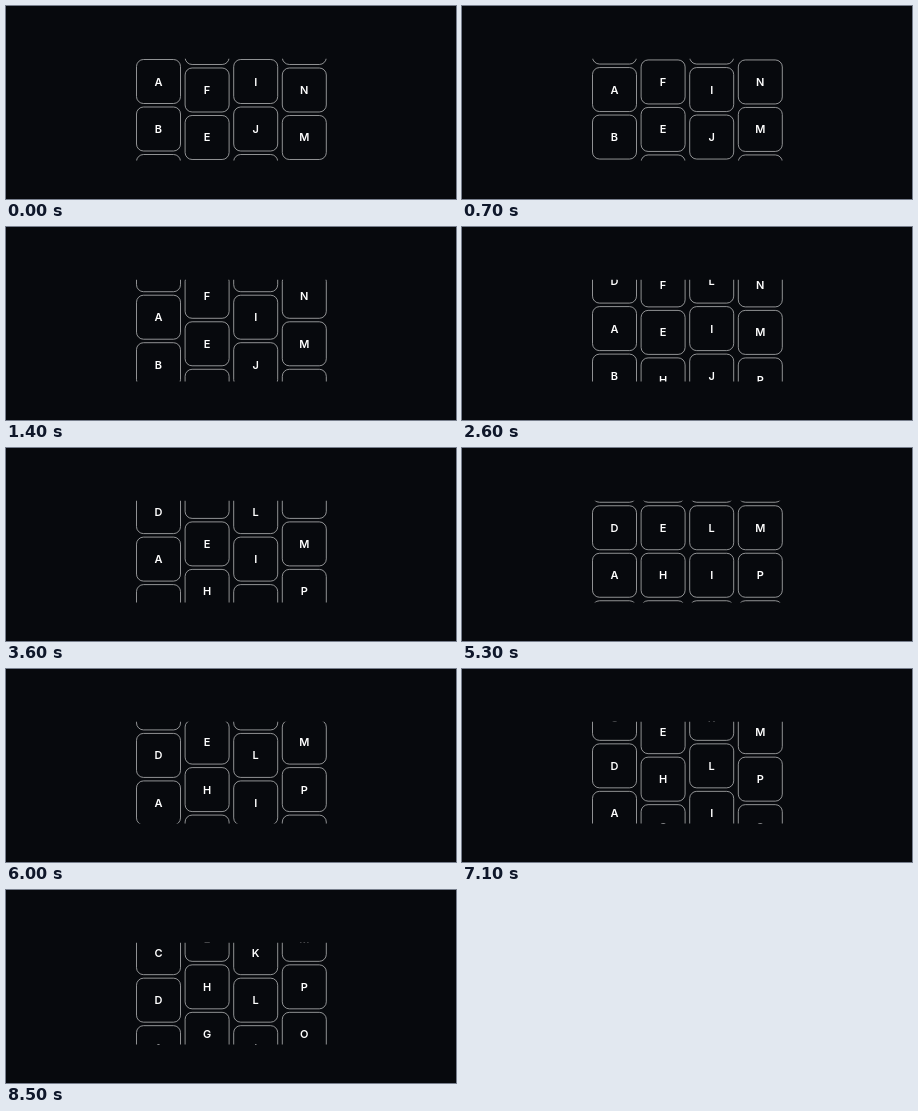
Recreate the animation shown at these times as an HTML page. Size 450 px wide and 193 px high, loop 8600 ms.

```html
<!DOCTYPE html>
<html lang="en">
<head>
<meta charset="utf-8">
<title>Letter tiles</title>
<style>
  html, body { margin: 0; width: 100%; height: 100%; overflow: hidden; background: #07090d; }
  svg { display: block; width: 100%; height: 100%; }
  rect.key { fill: none; stroke: #b4b5b7; stroke-width: .8; }
  text { font: 600 11px Inter, sans-serif; fill: #fff; text-anchor: middle; }
</style>
</head>
<body>
<svg viewBox="0 0 450 193">
  <defs><clipPath id="view"><rect x="129" y="52.8" width="193" height="101.7"/></clipPath></defs>
  <g id="board" clip-path="url(#view)"></g>
</svg>
<script>
const LOOP = 8600;
const SIZE = 44, PITCH = 47.5, COLUMN = 48.6, LEFT = 130.5;
const SPEED = PITCH / 5000;
const columns = [
  { letters: 'ABCD', top: 53.5, dir: 1 },
  { letters: 'FEHG', top: 62, dir: -1 },
  { letters: 'IJKL', top: 53.5, dir: 1 },
  { letters: 'NMPO', top: 62, dir: -1 }
];
const board = document.getElementById('board');

function add(parent, tag, attrs) {
  const node = document.createElementNS('http://www.w3.org/2000/svg', tag);
  for (const key in attrs) node.setAttribute(key, attrs[key]);
  return parent.appendChild(node);
}

columns.forEach((col, i) => {
  const x = LEFT + i * COLUMN;
  col.group = add(board, 'g', {});
  // Repeat the letters above and below so the strip always fills the view.
  for (let row = -4; row < 8; row++) {
    const y = row * PITCH;
    add(col.group, 'rect', { class: 'key', x, y, width: SIZE, height: SIZE, rx: 7 });
    add(col.group, 'text', { x: x + SIZE / 2, y: y + SIZE / 2 + 4 })
      .textContent = col.letters[(row + 4) % 4];
  }
});

function render(t) {
  // Steady drift with a slightly quicker start.
  const shift = SPEED * t + 1.4 * Math.min(t / 500, 1);
  for (const col of columns) {
    col.group.setAttribute('transform', `translate(0 ${(col.top + col.dir * shift).toFixed(3)})`);
  }
}

const start = performance.now();
function tick() {
  render((performance.now() - start) % LOOP);
  requestAnimationFrame(tick);
}
render(0);
requestAnimationFrame(tick);
</script>
</body>
</html>
```
